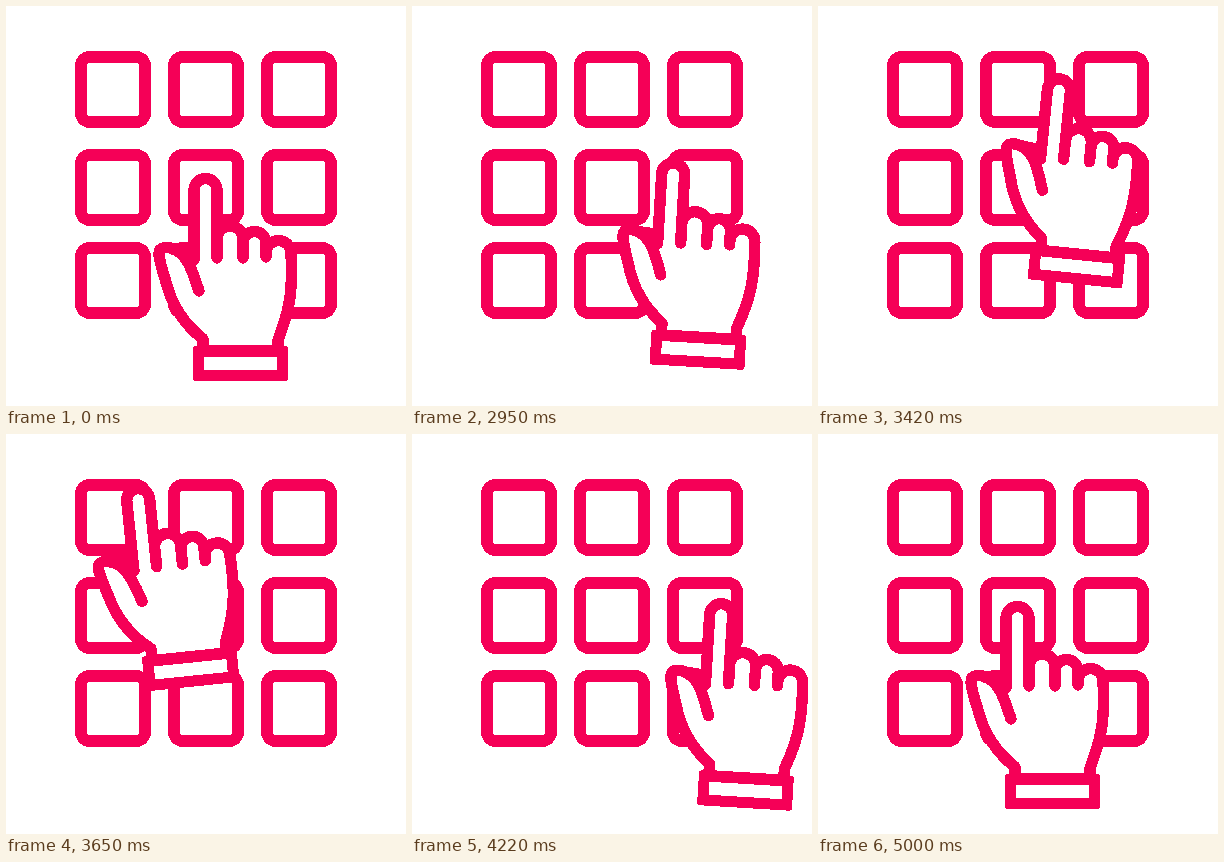
Write an HTML page that moves like this. It is 400 px wide and 400 px high and loops after 5.02 s.

```html
<!DOCTYPE html>
<html lang="en">
<head>
<meta charset="utf-8">
<title>Keypad</title>
<style>
  html, body { margin: 0; width: 100%; height: 100%; overflow: hidden; background: #fff; }
  svg { display: block; width: 100%; height: 100%; }
</style>
</head>
<body>
<svg viewBox="0 0 400 400" fill="none" stroke="#f50057" stroke-width="11.4"
     stroke-linecap="round" stroke-linejoin="round" shape-rendering="crispEdges">
  <g id="keys" stroke-width="12"></g>
  <g id="hand">
    <path fill="#fff" d="M197 345V333C178 318 166 300 160 276C156 263 153 254 153 248
      C153 240 162 241 168 243L188 245V184A11.5 11.5 0 0 1 211 184V233
      A13 13 0 0 1 237 233V237A11.5 11.5 0 0 1 260 237V247A12.5 12.5 0 0 1 285 247
      C287 285 283 302 277 320L272 334V345Z"/>
    <path d="M164 242C181 246 186 264 193 285M188 240V254M211 230V252M237 233V252M260 237V251"/>
    <rect x="187" y="340" width="95" height="35" rx="3" fill="#f50057" stroke="none"/>
    <rect x="198" y="351" width="73" height="13" fill="#fff" stroke="none"/>
  </g>
</svg>
<script>
const LOOP = 5020, START = 2520, STEP = 25;
const SVG_NS = 'http://www.w3.org/2000/svg';

// Where the hand turns on its way round the keypad
const rest = { x: 0, y: 0, turn: 0 };
const poses = [
  { t: 2500, ...rest },
  { t: 2820, x: 53, y: -4, turn: 2.5 },
  { t: 3420, x: 24, y: -97, turn: 5.7 },
  { t: 3720, x: -62, y: -125, turn: -8 },
  { t: 3950, x: 6, y: -110, turn: -8 },
  { t: 4220, x: 99, y: -1, turn: 3.5 },
  { t: 4670, x: 26, y: -1, turn: 6 },
  { t: 5000, ...rest },
];

function slope(i, key) {
  const a = poses[i], b = poses[i + 1];
  return a && b ? (b[key] - a[key]) / (b.t - a.t) : 0;
}

// Flat at turning points, so nothing overshoots its pose
function tangent(i, key) {
  const a = slope(i - 1, key), b = slope(i, key);
  return a * b <= 0 ? 0 : 2 * a * b / (a + b);
}

function sample(t, key) {
  const i = poses.findLastIndex(p => p.t <= t);
  const a = poses[i], b = poses[i + 1];
  if (!a || !b) return rest[key];
  const span = b.t - a.t, u = (t - a.t) / span, v = 1 - u;
  return a[key] * v * v * (1 + 2 * u) + b[key] * u * u * (3 - 2 * u)
    + span * u * v * (tangent(i, key) * v - tangent(i + 1, key) * u);
}

function addKey(x, y) {
  const key = document.createElementNS(SVG_NS, 'rect');
  const box = { x, y, width: 64, height: 65, rx: 9 };
  for (const name in box) key.setAttribute(name, box[name]);
  document.getElementById('keys').append(key);
}

for (const y of [51, 149, 242])
  for (let column = 0; column < 3; column++) addKey(75 + 93 * column, y);

const hand = document.getElementById('hand');
const origin = performance.now();

function draw() {
  const now = (performance.now() - origin) % LOOP;
  const t = now < START ? 0 : START + Math.floor((now - START) / STEP) * STEP;
  const [x, y, turn] = ['x', 'y', 'turn'].map(key => sample(t, key));
  hand.setAttribute('transform', `translate(${x} ${y}) rotate(${turn} 234.5 357.5)`);
  requestAnimationFrame(draw);
}
draw();
</script>
</body>
</html>
```
